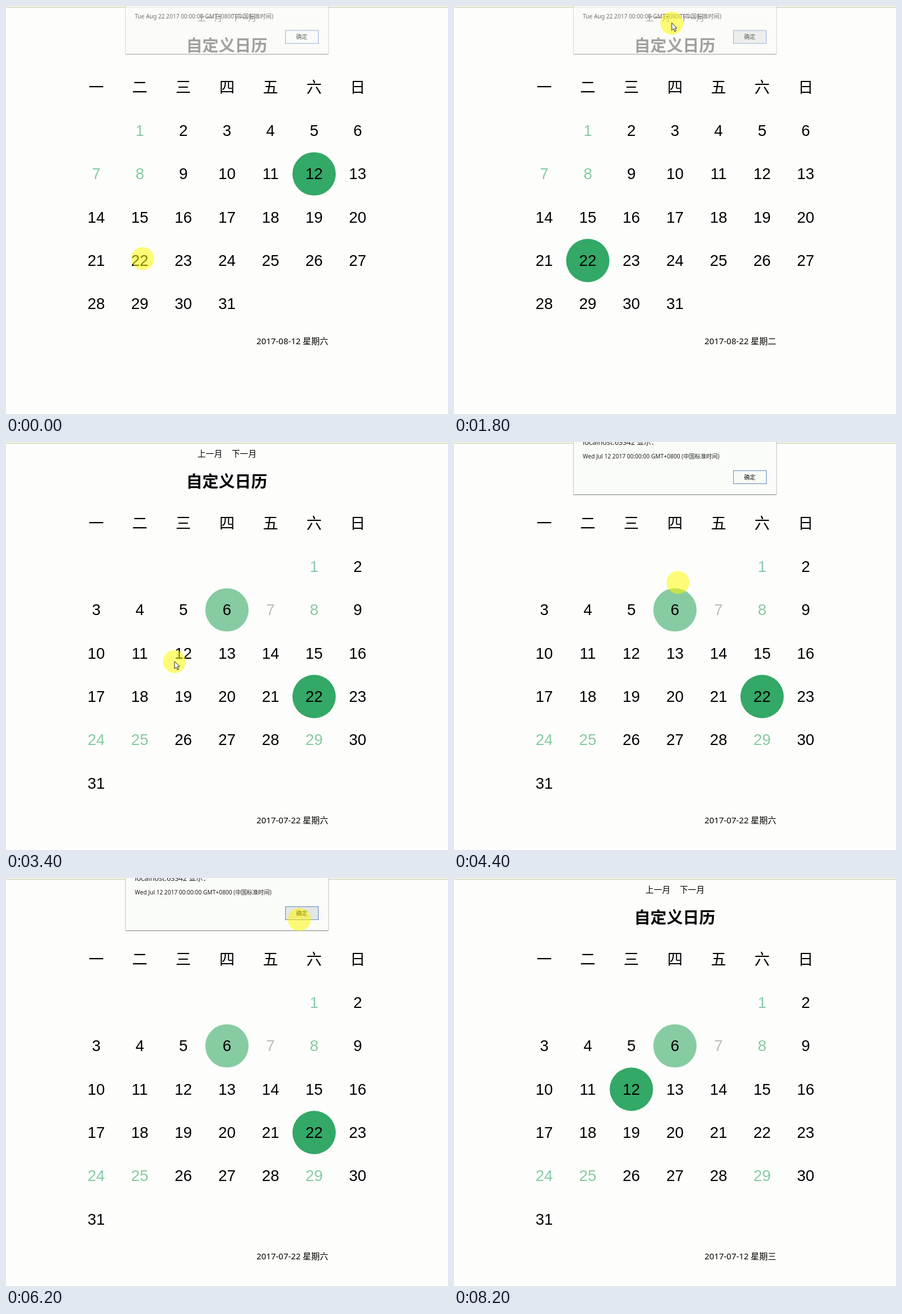
These frames come from a looping animation (779 px wide and 719 px high, 9200 ms). An HTML page with a canvas:

```html
<!DOCTYPE html>
<html lang="zh-CN">
<head>
<meta charset="utf-8">
<title>自定义日历</title>
<style>
html, body { margin: 0; width: 100%; height: 100%; overflow: hidden; background: #fdfefb; }
canvas { display: block; }
</style>
</head>
<body>
<canvas id="stage" width="779" height="719"></canvas>
<script>
const ctx = document.getElementById('stage').getContext('2d');
const LOOP = 9200, STEP = 200;
const UI = '"Noto Sans", "Noto Sans CJK SC", sans-serif';
const CJK = '"Noto Sans CJK SC", sans-serif';
const DIGITS = '"Liberation Sans", Arial, sans-serif';
const PAPER = '#fdfefb', GREEN = '#33a867', PALE = '#87cba3', GREY = '#bcbcbc';
const CELL_W = 76.8, CELL_H = 76.3, LEFT = 159, TOP = 143.3;
const WEEK = [...'一二三四五六日'];
const ARROW = new Path2D('M.5 .5V13.5L3.5 10.7 5.6 15.5 7.8 14.5 5.7 9.8H9.6Z');

const AUGUST = { index: 7, pale: [1, 7, 8] };
const JULY = { index: 6, pale: [1, 8, 24, 25, 29], grey: 7, today: 6 };

// Where the pointer rests: arrival, departure, x, y
const STOPS = [
  [0, 0, 241, 445],
  [600, 600, 452, 194],
  [1000, 1500, 515, 68],
  [1850, 2600, 362, 24],
  [3400, 4000, 297, 387],
  [4900, 6200, 517, 73],
  [7000, 7000, 449, 564],
  [7200, 8000, 444, 688]
];

const weekdayOf = date => (date.getDay() + 6) % 7;

function text(str, x, y, size, font, color = '#000', align = 'left', weight = 400) {
  ctx.font = `${weight} ${size}px ${font}`;
  ctx.textAlign = align;
  ctx.fillStyle = color;
  ctx.fillText(str, x, y);
}

function rect(x, y, w, h, color) {
  ctx.fillStyle = color;
  ctx.fillRect(x, y, w, h);
}

function disc(x, y, r, color) {
  ctx.fillStyle = color;
  ctx.beginPath();
  ctx.arc(x, y, r, 0, Math.PI * 2);
  ctx.fill();
}

function header() {
  rect(0, 0, 779, 2, '#f3f5e6');
  rect(0, 2, 779, 1, '#c5c9ae');
  text('上一月', 337.5, 25.5, 14.6, CJK);
  text('下一月', 397.7, 25.5, 14.6, CJK);
  text('自定义日历', 389, 80, 28.6, CJK, '#000', 'center', 700);
  WEEK.forEach((day, i) => text(day, LEFT + i * CELL_W, TOP + 9.7, 27, CJK, '#000', 'center'));
}

function calendar(view, selected) {
  const offset = weekdayOf(new Date(2017, view.index, 1));
  const rows = Math.ceil((31 + offset) / 7);
  for (let day = 1; day <= 31; day++) {
    const cell = day - 1 + offset;
    const x = LEFT + cell % 7 * CELL_W;
    const y = TOP + Math.floor(cell / 7 + 1) * CELL_H;
    if (day === selected) disc(x, y, 38.2, GREEN);
    else if (day === view.today) disc(x, y, 38.2, PALE);
    const color = view.pale.includes(day) ? PALE : day === view.grey ? GREY : '#000';
    text(day, x, y + 9.4, 27.4, DIGITS, color, 'center');
  }
  const weekday = WEEK[(offset + selected - 1) % 7];
  text(`2017-0${view.index + 1}-${selected} 星期${weekday}`, 441.5, TOP + rows * CELL_H + 71, 14.9, UI);
}

function dialog(date, alpha, rise, hover) {
  ctx.save();
  ctx.globalAlpha = alpha;
  ctx.translate(0, -rise);
  rect(211, -10, 357, 102, '#fafcf8');
  ctx.lineWidth = 1;
  ctx.strokeStyle = '#c0c4c0';
  ctx.strokeRect(210.5, -10.5, 358, 103);
  rect(211, 92, 357, 1.5, '#a4a8a4');
  text('localhost:63342 显示：', 227, 5, 12.5, UI, '#222');
  text(`${date.toDateString()} 00:00:00 GMT+0800 (中国标准时间)`, 227, 29.2, 10.1, UI, '#222');
  rect(493, 51, 57, 22, hover ? '#e4e6e4' : '#f8faf8');
  ctx.strokeStyle = '#5f86cd';
  ctx.strokeRect(492.5, 50.5, 58, 23);
  text('确定', 521.3, 65.9, 10, CJK, '#111', 'center', 500);
  ctx.restore();
}

// Half faded on its first and last step, solid between
function alertBox(t, start, end, date) {
  if (t < start || t > end) return;
  const fading = t === start || t === end;
  dialog(date, fading ? .64 : 1, fading ? 7.5 : 0, t >= start + 1000);
}

function pointer(t, arrow) {
  const next = STOPS.findIndex(stop => stop[0] > t);
  const [, leave, x0, y0] = STOPS.at(next < 0 ? -1 : next - 1);
  const [arrive, , x1, y1] = STOPS.at(next);
  if (next < 0 && t >= leave) return;
  const k = next < 0 ? 0 : Math.max(0, (t - leave) / (arrive - leave));
  const x = x0 + (x1 - x0) * k, y = y0 + (y1 - y0) * k;
  disc(x, y, 20.2, 'rgba(255,250,0,.53)');
  if (!arrow) return;
  ctx.save();
  ctx.translate(x - .5, y - 1);
  ctx.lineWidth = 1;
  ctx.strokeStyle = '#222';
  ctx.fillStyle = '#fff';
  ctx.fill(ARROW);
  ctx.stroke(ARROW);
  ctx.restore();
}

function draw(t) {
  rect(0, 0, 779, 719, PAPER);
  header();
  calendar(t < 2600 ? AUGUST : JULY, t >= 1800 && t < 6400 ? 22 : 12);
  alertBox(t, 0, 1800, new Date(2017, 7, 22));
  alertBox(t, 4000, 6400, new Date(2017, 6, 12));
  pointer(t, t >= 1800 && t < 3600 || t >= 6400);
}

function tick() {
  draw(Math.floor(performance.now() % LOOP / STEP) * STEP);
  requestAnimationFrame(tick);
}
tick();
</script>
</body>
</html>
```
